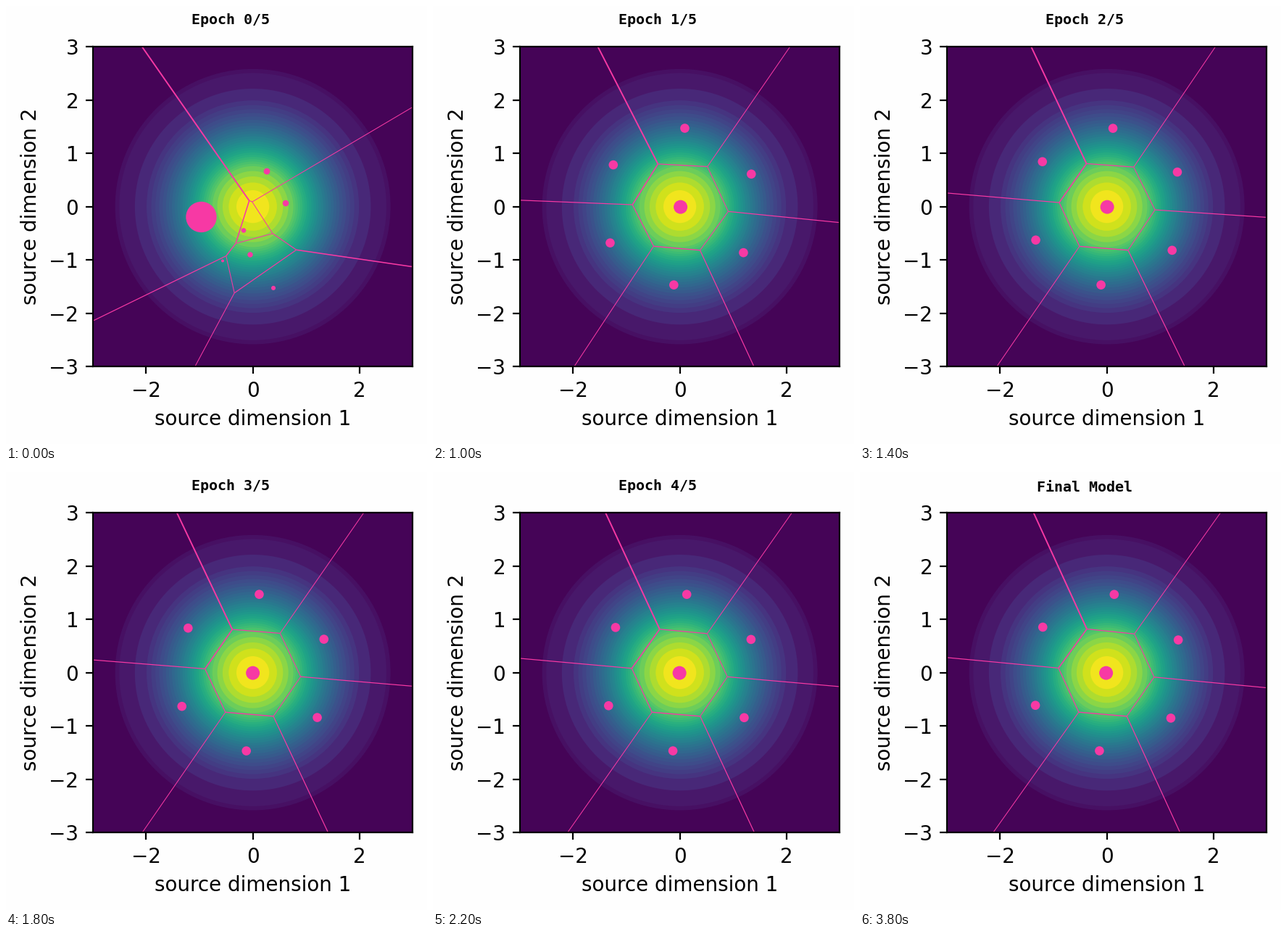
A matplotlib script for the animation above (4.6 s loop, 581 by 604 pixels).

```python
from itertools import combinations

import numpy as np
import matplotlib.pyplot as plt
from matplotlib.animation import FuncAnimation
from matplotlib.collections import LineCollection
from matplotlib.patches import Circle

W, H, DPI = 581, 604, 200
LEFT, RIGHT, TOP, BOTTOM = 119.75, 561.5, 56, 497.3
UNIT = (RIGHT - LEFT) / 6
CENTER = np.array([(LEFT + RIGHT) / 2, (TOP + BOTTOM) / 2])
PINK = "#f739a4"
STEP = 200  # ms
HOLDS = [5, 2, 2, 2, 2, 10]  # steps each state stays

# Sites are x, y and dot radius in stage pixels; the fifth ends in the middle.
START = np.array([
    (269.5, 291, 21.2), (369, 389, 3.05), (299, 351.5, 2), (337, 343, 3.7),
    (328, 309.5, 3.3), (386, 272, 4.3), (360, 228, 4.4),
])
SLOTS = np.array([2, 4, 3, 5, 0, 1])  # place of each outer site on the ring
RING, OUTER, INNER = 108.4, 6.3, 9.5
RATE = 1690  # how strongly a large dot pushes its borders away


def sites(k):
    """The start layout, then a ring that turns slowly while its sway dies out."""
    if k == 0:
        return START
    n = k - 1
    a = np.radians(26 - 0.35 * n + 60 * SLOTS)
    a += np.radians(2 * (-0.3) ** n * np.cos(a - np.radians(165)))
    ring = np.column_stack([CENTER[0] + RING * np.cos(a),
                            CENTER[1] - RING * np.sin(a),
                            np.full(6, OUTER)])
    middle = (CENTER[0] + 1 - 0.5 * n, CENTER[1] + 0.5, INNER)
    return np.insert(ring, 4, middle, axis=0)


def to_data(p):
    return (np.asarray(p) - CENTER) / (UNIT, -UNIT)


def borders(cells):
    """Segments and widths of the power diagram of the sites."""
    pos = cells[:, :2] - CENTER
    # Power distance of x to site i, less |x|^2, is slope[i] @ x + base[i].
    slope = -2 * pos
    base = (pos ** 2).sum(axis=1) - RATE * np.log(cells[:, 2])
    segments, widths = [], []
    for i, j in combinations(range(len(cells)), 2):
        normal = slope[j] - slope[i]
        origin = normal * (base[i] - base[j]) / (normal @ normal)
        along = np.array([-normal[1], normal[0]]) / np.hypot(*normal)
        lo, hi = -500, 500
        for m in set(range(len(cells))) - {i, j}:
            gap = slope[m] - slope[i]
            rise = gap @ along
            cut = -(gap @ origin + base[m] - base[i]) / rise
            lo, hi = (max(lo, cut), hi) if rise > 0 else (lo, min(hi, cut))
        if lo < hi:
            segments.append([to_data(CENTER + origin + t * along) for t in (lo, hi)])
            widths.append(0.85 + 0.18 * (j - i))
    return segments, np.array(widths) * 72 / DPI


plt.rcParams["font.family"] = "DejaVu Sans"
fig = plt.figure(figsize=(W / DPI, H / DPI), dpi=DPI, facecolor="#fefefe")
ax = fig.add_axes([LEFT / W, 1 - BOTTOM / H, (RIGHT - LEFT) / W, (BOTTOM - TOP) / H])
ax.set(xlim=(-3, 3), ylim=(-3, 3), xticks=[-2, 0, 2], yticks=range(-3, 4),
       xlabel="source dimension 1", ylabel="source dimension 2")

# Bands of a Gaussian density, finer on its flanks.
cmap = plt.get_cmap("viridis")
ax.set_facecolor(cmap(0.008))
levels = np.sort(np.r_[0.0358 + 0.051 * np.arange(19), 0.0435,
                       0.1635 + 0.051 * np.arange(12)])
for low, high in zip(levels, np.r_[levels[1:], 1]):
    ax.add_patch(Circle((0, 0), np.sqrt(-2 * np.log(low)), lw=0,
                        color=cmap((low + high) / 2)))

lines = ax.add_collection(LineCollection([], colors=PINK, zorder=2))
dots = [ax.add_patch(Circle((0, 0), 0.1, color=PINK, lw=0, zorder=2.2)) for _ in START]
title = fig.text(310 / W, 0, "", ha="center", va="baseline", fontsize=7.2,
                 family="DejaVu Sans Mono", weight="bold")

STATES = np.repeat(np.arange(len(HOLDS)), HOLDS)


def draw(i):
    k = int(STATES[i])
    cells = sites(k)
    segments, widths = borders(cells)
    lines.set_segments(segments)
    lines.set_linewidths(widths)
    for dot, (x, y, r) in zip(dots, cells):
        dot.center = to_data((x, y))
        dot.set_radius(r / UNIT)
    # The title is centred on its ink, so text without descenders sits lower.
    text, baseline = (f"Epoch {k}/5", 25) if k < 5 else ("Final Model", 27)
    title.set_text(text)
    title.set_y(1 - baseline / H)
    return [lines, title, *dots]


anim = FuncAnimation(fig, draw, frames=len(STATES), init_func=lambda: draw(0),
                     interval=STEP, repeat=True, blit=False)
plt.show()
```
